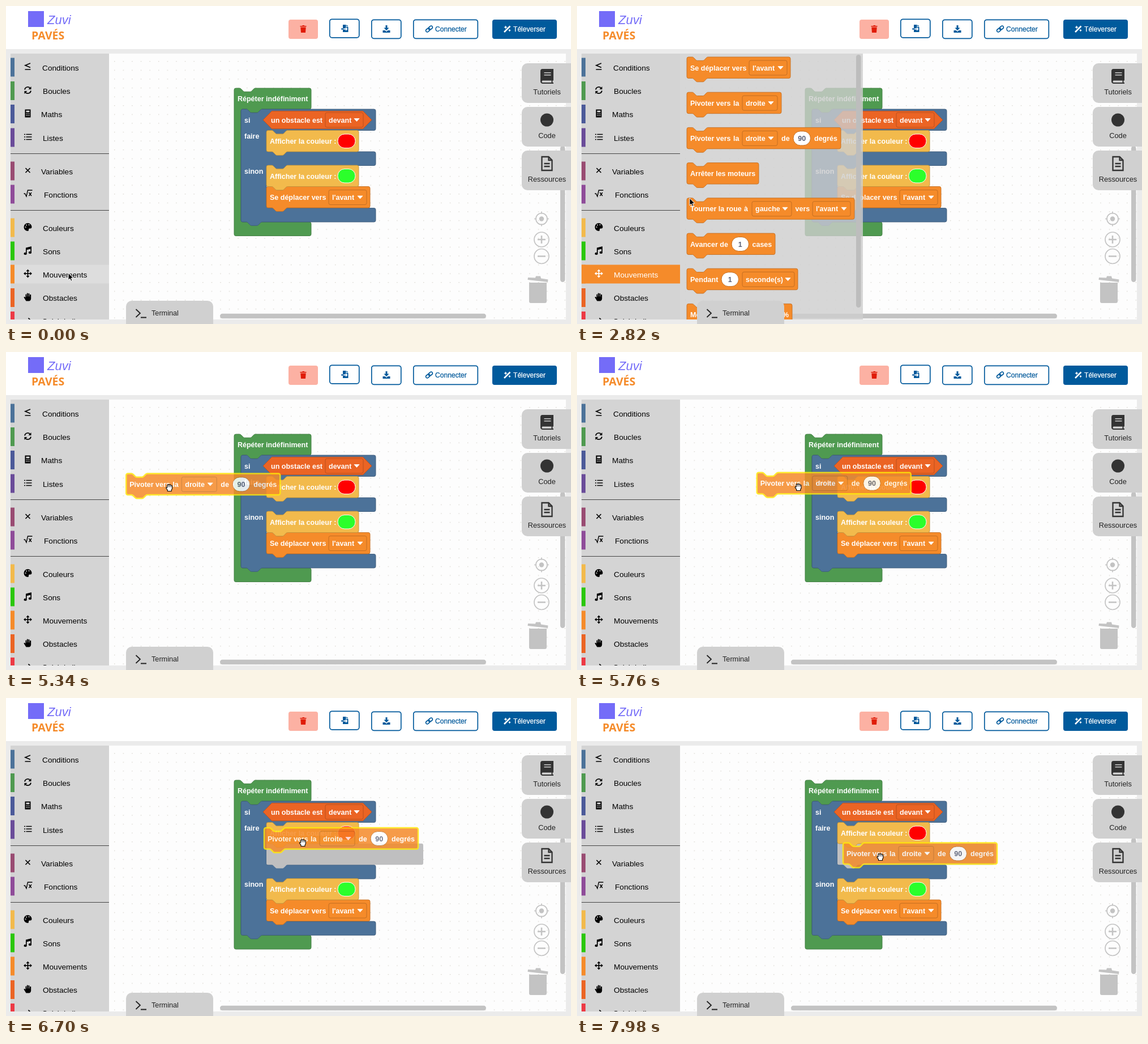
An HTML page that plays this animation: 998 px wide and 561 px high, repeating every 8000 ms.

```html
<!DOCTYPE html>
<html lang="fr">
<head>
<meta charset="utf-8">
<title>Programmation visuelle</title>
<style>
html, body { margin: 0; width: 100%; height: 100%; overflow: hidden; background: #fff; }
svg { display: block; width: 998px; height: 561px; font-family: "Liberation Sans", Arial, sans-serif; }
.b { font-weight: bold; font-size: 12.5px; fill: #fff; white-space: pre; }
.i { fill: none; stroke: currentColor; stroke-width: 1.7; }
.f { fill: currentColor; }
</style>
</head>
<body>
<svg id="stage" viewBox="0 0 998 561"></svg>
<script>
const LOOP = 8000;
const T = { open: 1660, hand: 3100, select: 3700, drag: 5220, insert: 6660 };
const BLUE = '#4c7299', GREEN = '#4f9a50', YELLOW = '#f2ba4c', ORANGE = '#f58b2a', RED = '#eb6424';
const DARK = { [BLUE]: '#3d5b7a', [GREEN]: '#3f7b40', [YELLOW]: '#c2953d', [ORANGE]: '#c46f22', [RED]: '#bc501d' };

const rect = (x, y, w, h, fill, r = 0, more = '') =>
  `<rect x="${x}" y="${y}" width="${w}" height="${h}" rx="${r}" fill="${fill}" ${more}/>`;
const text = (x, y, s, more = 'class="b"') => `<text x="${x}" y="${y}" ${more}>${s}</text>`;
const path = (d, more) => `<path d="${d}" ${more}/>`;
const line = (d, more = '') => path(d, `class="i" ${more}`);
const solid = (d, more = '') => path(d, `class="f" ${more}`);
const at = (x, y, s, more = '') => `<g transform="translate(${x} ${y})" ${more}>${s}</g>`;

// Puzzle outlines
const notch = d => `c${1.6 * d} 0 ${2.3 * d} .8 ${3.1 * d} 1.6l${3.1 * d} 3.1c${.8 * d} .8 ${1.6 * d} 1.6 ${3.1 * d} 1.6h${9.4 * d}` +
  `c${1.6 * d} 0 ${2.3 * d} -.8 ${3.1 * d} -1.6l${3.1 * d} -3.1c${.8 * d} -.8 ${1.6 * d} -1.6 ${3.1 * d} -1.6`;

// rows alternate solid rows and statement gaps
function outline(w, rows, inset = 0, tail = true) {
  let y = 0, d = `M0 3a3 3 0 0 1 3 -3h6.4${notch(1)}H${w - 3}a3 3 0 0 1 3 3`;
  rows.forEach((h, i) => {
    y += h;
    d += i % 2
      ? `H${inset + 37.4}${notch(-1)}H${inset + 3}a3 3 0 0 0 -3 3V${y - 3}a3 3 0 0 0 3 3H${w - 3}a3 3 0 0 1 3 3`
      : `V${y - 3}a3 3 0 0 1 -3 3`;
  });
  return d + (tail ? `H37.4${notch(-1)}` : '') + 'H3a3 3 0 0 1 -3 -3z';
}
const shape = (color, ...args) => path(outline(...args), `fill="${color}" stroke="${DARK[color]}" stroke-width=".9"`);
const field = (x, w, label, color = ORANGE) =>
  rect(x, 6, w, 26, color, 3, `stroke="${DARK[color]}"`) + text(x + 6, 23.5, label) +
  path(`M${x + w - 16} 16.5h9l-4.5 5z`, 'fill="#fff" stroke="#fff" stroke-width=".8" stroke-linejoin="round"');
const oval = (x, label) => rect(x, 6.5, 30.5, 25, '#fff', 12.5, `stroke="${DARK[ORANGE]}"`) +
  text(x + 15.2, 23.5, label, 'class="b" text-anchor="middle" style="fill:#575e75"');
const label = (x, s) => text(x, 23.5, s);
const block = (w, ...parts) => shape(ORANGE, w, [37.5]) + parts.join('');
const colorBlock = c => shape(YELLOW, 163, [37.5]) + label(6, 'Afficher la couleur :') +
  rect(126, 6.5, 31, 24.5, c, 12, 'stroke="#fff"');

const turn = [label(6, 'Pivoter vers'), label(82, 'la'), field(98, 62, 'droite')];
const move = block(183, label(6, 'Se déplacer vers'), field(110, 67, "l'avant"));
const turnBy = block(272, ...turn, label(167, 'de'), oval(188, '90'), label(225, 'degrés'));
const flyoutItems = [
  move,
  block(167, ...turn),
  turnBy,
  block(127, label(6, 'Arrêter les moteurs')),
  block(296, label(6, 'Tourner la roue'), label(101, 'à'), field(115, 70, 'gauche'), label(191.5, 'vers'), field(222, 67, "l'avant")),
  block(156, label(6, 'Avancer de'), oval(79, '1'), label(115.5, 'cases')),
  block(196, label(6, 'Pendant'), oval(61, '1'), field(98, 92, 'seconde(s)')),
  block(186, label(6, 'Mettre la vitesse à'), label(169, '%'))
];

// Program; "extra" is the height of the insertion preview
function program(extra) {
  const y2 = 281.5 + extra;
  const cond = path('M454 201L469.5 185.3H630.5L646 201L630.5 216.7H469.5z', `fill="${RED}" stroke="${DARK[RED]}"`) +
    text(468, 205.5, 'un obstacle est') + at(0, 182, field(564, 67, 'devant', RED));
  const ghost = extra ? at(460, 256.8, path(outline(277, [37.5]), 'fill="#bfbfc0"')) : '';
  return at(403, 145, shape(GREEN, 136, [37, 199 + extra, 24.5], 12, false)) + text(409, 168, 'Répéter indéfiniment') +
    at(415, 182, shape(BLUE, 238, [37.5, 37.5 + extra, 24.5, 75, 24.5], 45)) +
    text(421, 205.5, 'si') + cond + text(421, 234, 'faire') + text(421, y2 + 14, 'sinon') +
    ghost + at(460, 219.5, colorBlock('#f00')) +
    at(460, y2 + 37, move) + at(460, y2 - .5, colorBlock('#2bff2b'));
}

// Toolbox
const arms = [0, 90, 180, 270].map(a => `<g transform="rotate(${a})">${line('M0 0V-5')}${solid('M0 -7.5l3 3.5h-6z')}</g>`).join('');
const icons = {
  le: line('M4.5 -6L-4.5 -2.2L4.5 1.5M-5 5H5'),
  sync: line('M-5.5 -1A5.6 5.6 0 0 1 4.5 -3.4M5.5 1A5.6 5.6 0 0 1 -4.5 3.4') + solid('M6 -6.5V-1.5H1zM-6 6.5V1.5H-1z'),
  calc: solid('M-5 -7H5V7H-5zM-3 -5V-2H3V-5z' +
    [-3, -.7, 1.7].map(x => `M${x} 0v1.5h1.5v-1.5zm0 3v1.5h1.5v-1.5z`).join(''), 'fill-rule="evenodd"'),
  list: line('M-3 -4.5H7M-3 0H7M-3 4.5H7M-6.5 -4.5h2M-6.5 0h2M-6.5 4.5h2'),
  cross: line('M-4 -4L4 4M4 -4L-4 4'),
  root: line('M-7 0h2l2.5 5L0 -6H8M2 -2L6.5 4M6.5 -2L2 4', 'style="stroke-width:1.4"'),
  palette: solid('M0 -7A7 7 0 1 0 0 7C3 7 0 3 3 2.5C6 2.5 7 2 7 -.5A7 6.5 0 0 0 0 -7z' +
    ['-5 0', '-3.5 -3.5', '1 -4'].map(p => `M${p}a1.1 1.1 0 1 1 2.2 0a1.1 1.1 0 1 1 -2.2 0`).join(''), 'fill-rule="evenodd"'),
  music: solid('M-3.5 -4.5L6.5 -7V3.5A2.6 2 0 1 1 4.8 2V-2.5L-1.8 -.8V5.5A2.6 2 0 1 1 -3.5 4z'),
  arms,
  hand: solid('M-3 7L-7 .5Q-6 -1.5 -4 1V-4.5Q-3 -6 -2.2 -4.5V-1H-1.6V-6.5Q-.6 -8 .3 -6.5V-1H.9V-6Q2 -7.5 2.9 -6V-1H3.5V-4Q5 -5.3 5.7 -4V3Q5 7 2 7z'),
  arrow: line('M-6 0H5M1 -4L5 0L1 4')
};
const menu = [
  [108, 64, 'Conditions', BLUE, 'le'], [149.5, 65, 'Boucles', GREEN, 'sync'],
  [190.5, 62, 'Maths', '#4c5a99', 'calc'], [232, 65, 'Listes', '#6a4c99', 'list'],
  [291, 62, 'Variables', '#994c72', 'cross'], [332, 67, 'Fonctions', '#8f4c99', 'root'],
  [391, 65, 'Couleurs', YELLOW, 'palette'], [432, 65, 'Sons', '#2ac70b', 'music'],
  [473, 65, 'Mouvements', ORANGE, 'arms'], [514.5, 65, 'Obstacles', RED, 'hand'],
  [555.5, 64, 'Suivi de ligne', '#ed3a45', 'arrow']
];
const toolbox = rect(8, 84, 174, 469, '#d4d4d4') + rect(8, 456.5, 174, 33, '#ddd', 0, 'id="row"') +
  line('M8 260.5H182M8 360.5H182', 'style="stroke:#444;stroke-width:1"') +
  menu.map(([y, x, name, color, icon]) => rect(8, y - 16.5, 7, 33, color) +
    `<g color="#000" ${name === 'Mouvements' ? 'id="item"' : ''}>` + at(38.5, y - 1, icons[icon]) +
    text(x, y + 5.5, name, 'class="f" font-size="13.7"') + '</g>').join('');

// Header
const button = (x, y, w, h, fill, edge) => rect(x, y, w, h, fill, 4, edge ? 'stroke="#00599b" stroke-width="1.7"' : '');
const link = x => rect(x, -2.5, 8, 5, 'none', 2.5, 'class="i"');
const header = rect(0, 0, 998, 76, '#fff') + rect(39, 9, 28, 28, '#746cf8') +
  text(73, 32, 'Zuvi', 'font-size="22" font-style="italic" fill="#746cf8"') +
  text(45, 59, 'PAVÉS', 'font-size="19.5" font-weight="bold" font-family="Open Sans, sans-serif" fill="#f58b2a"') +
  button(499, 24, 52, 34, '#fcb1a3') +
  at(525, 40.5, solid('M-5.5 -5.5H-2L-1 -6.5H1.5L2.5 -5.5H5.5V-4H-5.5zM-4.7 -3H4.7L4 6.5H-4z'), 'color="#e01c08"') +
  '<g color="#00599b">' + button(571.8, 23.3, 52, 32.5, '#fff', 1) +
  at(599, 39.5, solid('M-4 -6.5H1.5V-2.5H5.5V6.5H-4V2H1V4.5L4.5 1L1 -2.5V0H-4zM2.5 -6.5L5.5 -3.5H2.5zM-7 0H-3V2H-7z')) +
  button(645.8, 24.3, 52, 33, '#fff', 1) +
  at(672, 40.5, solid('M-1.5 -6.5H1.5V-2H4.5L0 2.8L-4.5 -2H-1.5zM-6.5 2.5H-2.5L0 4.8L2.5 2.5H6.5V6.5H-6.5z')) +
  button(719.8, 24.3, 113.5, 33, '#fff', 1) +
  at(747.5, 40.5, `<g transform="rotate(-40)">${link(-7)}${link(-1)}</g>`) +
  text(758, 45, 'Connecter', 'class="f" font-size="12.1" stroke="#00599b" stroke-width=".25"') + '</g>' +
  button(859, 24, 114, 34, '#005a9c') +
  at(885.5, 40.5, line('M-5.5 5.5L5 -5', 'style="stroke-width:2.6"') +
    solid('M-3 -6l1 2 2 1-2 1-1 2-1-2-2-1 2-1zM4 0l.8 1.7 1.7 .8-1.7 .8L4 5l-.8-1.7-1.7-.8 1.7-.8z'), 'color="#fff"') +
  text(896, 45, 'Téleverser', 'font-size="12.1" fill="#fff" stroke="#fff" stroke-width=".25"');

// Side tabs and workspace controls
const sideTab = (y, name, icon) => path(`M998 ${y}H921a10 10 0 0 0 -10 10v50a10 10 0 0 0 10 10H998z`, 'fill="#d0d0d0"') +
  at(955.5, y + 23, icon, 'color="#333"') + text(955.5, y + 54.5, name, 'font-size="12.8" text-anchor="middle" fill="#222"');
const tabs = sideTab(101, 'Tutoriels', solid('M-8 -13H11.5V7.5H10V11H11.5V13H-8Q-11.5 12 -11.5 9V-9Q-11.5 -13 -8 -13zM-5 -7V-5.5H7V-7zM-5 -3V-1.5H7V-3zM-8 7.5Q-10 9.5 -8 11H8V7.5z', 'fill-rule="evenodd"')) +
  sideTab(178, 'Code', '<circle r="11.5" fill="#333"/>') +
  sideTab(255, 'Ressources', line('M-9 -12H3L9 -6V12H-9zM3 -12V-6H9M-5 0H5M-5 5H5', 'style="stroke-width:2.3"'));
const ring = r => `<circle r="${r}" class="i"/>`;
const controls = '<g color="#c3c3c3">' +
  at(946, 375.5, ring(10) + '<circle r="4.2" class="f"/>' + line('M0 -13V-9M0 9V13M-13 0H-9M9 0H13')) +
  at(946, 412, ring(13) + line('M-7 0H7M0 -7V7', 'style="stroke-width:2.5"')) +
  at(946, 441.5, ring(13) + line('M-7 0H7', 'style="stroke-width:2.5"')) +
  solid('M924 488H955V521Q955 524 952 524H927Q924 524 924 521zM922 479L935 479.5L936 476.5H944L945 480.5L957.5 482.5L957 487L921.5 483z') + '</g>';
const terminal = path('M212 561V530a10 10 0 0 1 10 -10H356a10 10 0 0 1 10 10V561z', 'fill="#d0d0d0"') +
  line('M229.5 535L237 542L229.5 549M238 549.5H248', 'style="stroke:#222;stroke-width:1.8"') +
  text(257, 546.3, 'Terminal', 'font-size="12.7" fill="#222"');

const arrowCursor = path('M0 0V12.5L2.9 9.9L4.9 14.3L7 13.4L5.1 9.1H9z', 'fill="#000" stroke="#fff"');
const handCursor = path('M-3 6.5V4.5L-5.5 1Q-5.5 -1 -3.5 0V-4Q-2.5 -6 -1.2 -4.5Q0 -6.2 1.2 -4.5Q2.5 -5.5 3.5 -3.8Q5.5 -4 5.3 -1.5V2L4 4.5V6.5z', 'fill="#fff" stroke="#000" stroke-width="1.1"') +
  path('M-1.2 -4V-.5M1.2 -4V-.5M3.5 -3.3V-.5', 'stroke="#000" stroke-width=".8"');

const stage = document.getElementById('stage');
stage.innerHTML = `<defs>
  <pattern id="dots" x="191" y="97" width="15.6" height="15.6" patternUnits="userSpaceOnUse">${rect(0, 0, 1.4, 1.4, '#d9d6cf')}</pattern>
  <clipPath id="page">${rect(8, 84, 981, 469, '#000')}</clipPath></defs>` +
  rect(0, 0, 998, 561, '#ebebeb') + header +
  '<g clip-path="url(#page)">' + rect(182, 84, 807.5, 469, '#fdfdfd') + rect(182, 84, 807, 469, 'url(#dots)') +
  controls + rect(979, 247, 8.5, 240, '#c3c3c3', 4.2) + rect(378, 542.7, 470, 8.5, '#c3c3c3', 4.2) +
  `<g id="before">${program(0)}</g><g id="after">${program(37.6)}</g>` +
  '<g id="flyout">' + rect(182, 84, 323, 469, '#cfcfcf', 0, 'opacity=".8"') + rect(493, 86, 8.5, 446, '#bdbdbd', 4.2) +
  flyoutItems.map((b, i) => at(194, 90 + 62.2 * i, b)).join('') + '</g>' + toolbox +
  `<g id="drag">${turnBy}${path(outline(272, [37.5]), 'fill="none" stroke="#ffe60a" stroke-width="2.5"')}</g></g>` +
  tabs + terminal + `<g id="arrow">${arrowCursor}</g><g id="hand">${handCursor}</g>`;

const el = id => document.getElementById(id);
const show = (id, on) => el(id).setAttribute('display', on ? 'inline' : 'none');
const place = (id, [x, y]) => el(id).setAttribute('transform', `translate(${x.toFixed(2)} ${y.toFixed(2)})`);

// Keys: time, x, y
const dragKeys = [[T.drag, 194, 214.4], [5340, 212, 214.4], [6180, 423, 211], [6700, 456, 229], [7160, 469, 249.5], [7500, 470, 255.5]];
const cursorKeys = [[2400, 110, 471], [2850, 205, 330], [3350, 270.5, 237], [T.drag, 270.5, 237], [5340, 288, 239],
  [6180, 493, 237], [6700, 524, 255], [7160, 535, 275], [7500, 535.5, 280]];

function track(keys, t) {
  const i = keys.findIndex(k => k[0] > t);
  if (i === 0) return keys[0].slice(1);
  if (i < 0) return keys[keys.length - 1].slice(1);
  const a = keys[i - 1], b = keys[i], u = (t - a[0]) / (b[0] - a[0]);
  return [1, 2].map(n => a[n] + (b[n] - a[n]) * u);
}

function draw(t) {
  const open = t >= T.open && t < T.drag;
  const dragging = t >= T.drag;
  show('flyout', open);
  show('row', !dragging);
  el('row').setAttribute('fill', open ? ORANGE : '#ddd');
  el('item').setAttribute('color', open ? '#fff' : '#000');
  show('before', t < T.insert);
  show('after', t >= T.insert);
  show('drag', t >= T.select);
  el('drag').setAttribute('opacity', dragging ? .85 : 1);
  place('drag', track(dragKeys, t));
  const cursor = track(cursorKeys, t);
  show('arrow', t < T.hand);
  show('hand', t >= T.hand);
  place('arrow', cursor);
  place('hand', cursor);
}

const start = performance.now();
function tick() {
  draw((performance.now() - start) % LOOP);
  requestAnimationFrame(tick);
}
tick();
</script>
</body>
</html>
```
